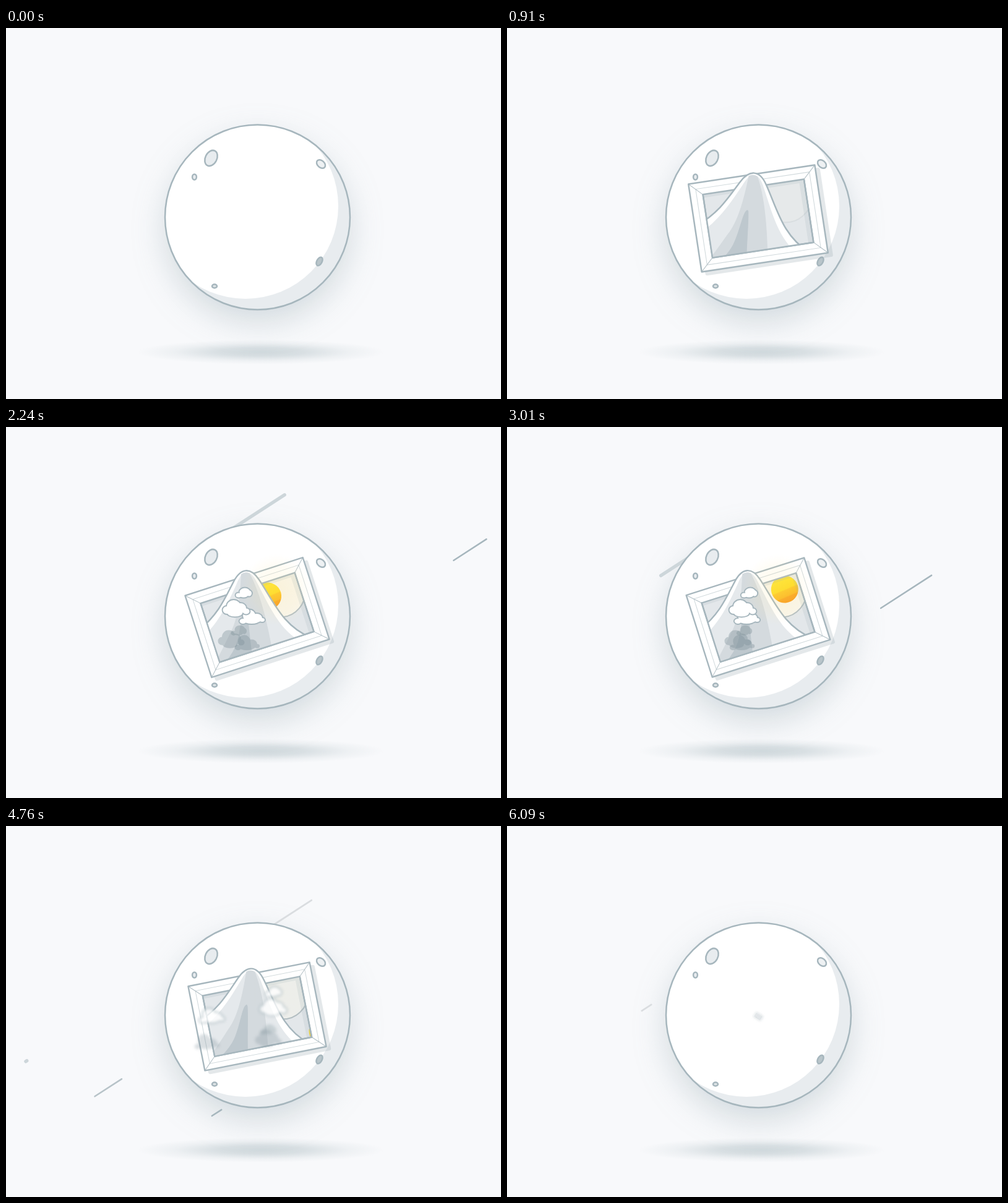
Recreate the animation shown at these times as an HTML page with a canvas. Size 800 px wide and 600 px high, loop 6.16 s.

```html
<!DOCTYPE html>
<html lang="en">
<head>
<meta charset="utf-8">
<title>Mountain picture</title>
<style>
  html, body { margin: 0; width: 100%; height: 100%; overflow: hidden; background: #f8f9fb; }
  canvas { display: block; width: 800px; height: 600px; }
</style>
</head>
<body>
<canvas id="stage" width="800" height="600"></canvas>
<script>
const LOOP = 6160, STEP = 70, TAU = Math.PI * 2, DEG = Math.PI / 180;
const LINE = '#a6b6bd', SHADE = '#e8ecef';
const CX = 406, CY = 308, TILT = 13 * DEG;
const ctx = document.getElementById('stage').getContext('2d');
const layer = document.createElement('canvas');
layer.width = 800;
layer.height = 600;
const lctx = layer.getContext('2d');

// Easing
const part = (t, a, b) => Math.min(1, Math.max(0, (t - a) / (b - a)));
const ramp = (t, a, b) => { const u = part(t, a, b); return u * u * (3 - 2 * u); };
const fade = (t, a, b, c, d) => ramp(t, a, b) * (1 - ramp(t, c, d));
const backOut = u => 1 + 2.70158 * (u - 1) ** 3 + 1.70158 * (u - 1) ** 2;

const pictureScale = t => Math.min(backOut(part(t, 70, 1070)), 1) === 1 && t > 1070 && t < 5104
  ? 1 : backOut(t < 3000 ? part(t, 70, 1070) : part(6104 - t, 0, 1000));

// Slow swing, with a fading turn on entry and a spin on exit
const pictureAngle = t => (-15.2 + 4 * Math.cos(TAU * (t - 4900) / 5000)
  + 14.4 * Math.exp((70 - t) / 857) + 50 * part(t, 5600, 6100) ** 3) * DEG;

const pictureBlur = t => 1.6 * (1 - ramp(t, 300, 1000)) + 1.4 * ramp(t, 5600, 6000);
const mountainDrop = t => 4 + 118 * (1 - part(t, 300, 1100)) ** 2 + 120 * part(t, 5000, 5750) ** 2;

const meteors = [
  { x: 550, base: 401.5, from: 1260, width: 5.5, color: '#cdd6da' },
  { x: 786, base: 684.5, from: 2030, width: 2.5, color: LINE },
  { x: 671, base: 440, from: 3360, width: 2.8, color: '#dadde0' },
  { x: 468, base: 530.3, from: 2860, width: 2.5, color: '#b7c3c8' }
];

// Lobes: x, y, rx, ry
const clouds = [
  { x: 384, y: 268, drift: 48, kick: -28, drop: 61,
    lobes: [[2, -1, 8.5, 6.5], [-8, 4, 4.5, 3.5], [9, 1, 4, 4.5], [0, 4, 7, 3.5]] },
  { x: 397, y: 308, drift: -65, kick: 78, drop: 42,
    lobes: [[-4, -3, 10, 9.5], [-14, 6, 5.5, 4], [8, 1, 9, 7], [17, 4, 4, 3], [0, 6, 12, 4]] },
  { x: 371, y: 294, drift: 60, kick: -43, drop: 50,
    lobes: [[-3, -4, 11, 10], [-14, 2, 6.5, 6], [8, -1, 9, 8], [17, 4, 5.5, 4.5], [-1, 7, 12, 5.5]] }
];
for (const c of clouds) {
  c.path = new Path2D();
  for (const [x, y, rx, ry] of c.lobes) {
    c.path.moveTo(x + rx, y);
    c.path.ellipse(x, y, rx, ry, 0, 0, TAU);
  }
}
const cloudX = (c, t) => c.x + c.drift * Math.max(0, (t - 2240) / 2520) ** 1.6
  + c.kick * (1 - ramp(t, 1150, 2100));

const mountain = new Path2D('M-110 18 L-95 8 C-62 -15 -50 -38 -33 -65 C-26 -76 -19 -81 -12 -81 ' +
  'C-4 -81 2 -76 8 -65 C28 -29 40 14 84 36 L110 46 L110 140 L-110 140 Z');
const body = new Path2D('M-110 34 C-66 8 -46 -30 -29 -60 C-23 -72 -18 -78 -12 -78 ' +
  'C-6 -78 -1 -73 3 -64 C21 -22 34 22 72 44 L110 140 L-110 140 Z');
const band = new Path2D('M-20 -76 C-25 -36 -32 -2 -46 18 C-58 38 -70 58 -85 80 L22 80 C18 20 10 -40 -6 -76 Q-13 -80 -20 -76 Z');
const wedge = new Path2D('M-19 -22 C-25 -18 -27 10 -36 33 Q-44 52 -66 72 L-12 72 C-15 40 -14 0 -16 -20 Q-17 -24 -19 -22 Z');

function circle(x, y, r) {
  ctx.beginPath();
  ctx.arc(x, y, r, 0, TAU);
}

function blur(px) {
  ctx.filter = px > 0.05 ? `blur(${px.toFixed(2)}px)` : 'none';
}

function drawGround() {
  ctx.fillStyle = '#f8f9fb';
  ctx.fillRect(0, 0, 800, 600);
  ctx.save();
  ctx.translate(412, 524);
  ctx.scale(10, 1);
  const g = ctx.createRadialGradient(0, 0, 0, 0, 0, 20);
  g.addColorStop(0, 'rgba(206,215,219,.95)');
  g.addColorStop(0.35, 'rgba(206,215,219,.75)');
  g.addColorStop(0.7, 'rgba(206,215,219,.25)');
  g.addColorStop(1, 'rgba(206,215,219,0)');
  ctx.fillStyle = g;
  ctx.fillRect(-20, -20, 40, 40);
  ctx.restore();

  ctx.save();
  ctx.shadowColor = 'rgba(140,160,168,.35)';
  ctx.shadowBlur = 52;
  ctx.shadowOffsetY = 20;
  ctx.fillStyle = '#fff';
  circle(406.5, 306, 149);
  ctx.fill();
  ctx.restore();
}

// The head runs evenly; the tail starts late and catches up
function drawMeteor(m, t) {
  const age = t - m.from, u = age / 3600;
  if (u <= 0 || u >= 1) return;
  const head = m.x - Math.min(518, 30 + 0.155 * age);
  const tail = m.x - 520 * (0.4 * (1 - Math.cos(Math.PI * u)) + 0.2 * u);
  if (tail < head) return;
  ctx.strokeStyle = m.color;
  ctx.lineWidth = m.width;
  ctx.lineCap = 'round';
  ctx.beginPath();
  ctx.moveTo(head, m.base - head * 0.648);
  ctx.lineTo(tail, m.base - tail * 0.648);
  ctx.stroke();
}

function crater(x, y, rx, ry, angle, fill) {
  ctx.fillStyle = fill;
  ctx.beginPath();
  ctx.ellipse(x, y, rx, ry, angle * DEG, 0, TAU);
  ctx.fill();
  ctx.stroke();
}

function drawBall() {
  ctx.save();
  circle(406.5, 306, 149.5);
  ctx.clip();
  ctx.fillStyle = SHADE;
  ctx.fillRect(250, 150, 310, 310);
  ctx.fillStyle = '#fff';
  circle(387, 288, 150);
  ctx.fill();
  ctx.restore();
  ctx.strokeStyle = LINE;
  ctx.lineWidth = 2.5;
  circle(406.5, 306, 149.5);
  ctx.stroke();
  crater(331.5, 210.5, 9.3, 13.3, 27, SHADE);
  crater(304.5, 241, 3.4, 4.4, 0, SHADE);
  crater(509, 220, 5.6, 8, -48, '#eef1f3');
  crater(506.5, 377.5, 4.2, 7.4, 28, '#b9c5ca');
  crater(337, 417.5, 4, 2.9, 0, '#dde3e6');
}

function drawSun(t) {
  const x = 20 + 0.0342 * (t - 2240);
  if (t < 1400 || x > 110) return;
  const y = -42 + 0.016 * (x - 44) ** 2;
  const g = ctx.createLinearGradient(x - 7, y - 21, x + 7, y + 21);
  g.addColorStop(0, '#ffe72e');
  g.addColorStop(0.5, '#fedb20');
  g.addColorStop(0.54, '#fdc620');
  g.addColorStop(0.76, '#fcb81e');
  g.addColorStop(0.8, '#f9a41b');
  g.addColorStop(1, '#f89a1a');
  ctx.fillStyle = g;
  circle(x, y, 22);
  ctx.fill();
}

function drawSky(t, warm) {
  ctx.save();
  ctx.beginPath();
  ctx.rect(-80, -50, 160, 100);
  ctx.clip();
  ctx.fillStyle = '#e3e7ea';
  ctx.fillRect(-80, -50, 160, 100);
  ctx.save();
  ctx.rotate(TILT);
  ctx.globalAlpha = fade(t, 750, 1250, 4900, 5350);
  const mix = (a, b) => Math.round(a + (b - a) * warm);
  ctx.fillStyle = `rgb(${mix(236, 249)},${mix(237, 246)},${mix(235, 236)})`;
  ctx.strokeStyle = '#b3bec2';
  ctx.lineWidth = 2;
  circle(40, -38, 41);
  ctx.fill();
  ctx.stroke();
  ctx.globalAlpha = 1;
  drawSun(t);
  ctx.restore();
  ctx.fillStyle = 'rgba(150,166,174,.16)';
  ctx.fillRect(72, -50, 8, 100);
  ctx.fillRect(-80, -50, 152, 5);
  ctx.restore();
}

function drawBorder() {
  ctx.fillStyle = '#fff';
  ctx.beginPath();
  ctx.rect(-100, -69.5, 200, 139);
  ctx.rect(-80, -50, 160, 100);
  ctx.fill('evenodd');
  ctx.strokeStyle = '#cfd8db';
  ctx.lineWidth = 1;
  ctx.strokeRect(-90, -60, 180, 120);
  ctx.strokeStyle = '#b3c0c6';
  ctx.beginPath();
  for (const sx of [-1, 1]) for (const sy of [-1, 1]) {
    ctx.moveTo(100 * sx, 69.5 * sy);
    ctx.lineTo(80 * sx, 50 * sy);
  }
  ctx.stroke();
  ctx.strokeStyle = LINE;
  ctx.lineWidth = 2.4;
  ctx.strokeRect(-100, -69.5, 200, 139);
  ctx.strokeRect(-80, -50, 160, 100);
}

function drawMountain(t) {
  ctx.save();
  ctx.beginPath();
  ctx.rect(-80, -130, 160, 180);
  ctx.clip();
  ctx.rotate(TILT);
  ctx.translate(0, mountainDrop(t));
  ctx.save();
  ctx.clip(mountain);
  for (const [path, fill] of [[mountain, '#fff'], [body, '#e5e9ec'], [band, '#d4dade'], [wedge, '#bec8ce']]) {
    ctx.fillStyle = fill;
    ctx.fill(path);
  }
  ctx.restore();
  ctx.strokeStyle = LINE;
  ctx.lineWidth = 2.4;
  ctx.stroke(mountain);
  ctx.restore();
}

function drawGlow(warm) {
  const g = ctx.createRadialGradient(36, -42, 8, 36, -42, 58);
  g.addColorStop(0, `rgba(255,226,140,${0.16 * warm})`);
  g.addColorStop(0.6, `rgba(255,230,160,${0.11 * warm})`);
  g.addColorStop(1, 'rgba(255,235,180,0)');
  ctx.fillStyle = g;
  circle(36, -42, 58);
  ctx.fill();
}

function drawPicture(t) {
  const s = pictureScale(t);
  if (s <= 0) return;
  const angle = pictureAngle(t), soft = pictureBlur(t);
  const warm = fade(t, 1400, 2200, 3900, 4950);
  ctx.save();
  ctx.lineJoin = 'round';
  ctx.translate(CX, CY);

  ctx.save();
  ctx.translate(7 * s, 5 * s);
  ctx.rotate(angle);
  ctx.scale(s, s);
  blur(soft * 1.5);
  ctx.fillStyle = 'rgba(150,167,175,.26)';
  ctx.beginPath();
  ctx.roundRect(-101, -70.5, 202, 141, 3);
  ctx.fill();
  ctx.restore();

  ctx.rotate(angle);
  ctx.scale(s, s);
  drawSky(t, warm);
  blur(soft);
  drawBorder();
  ctx.filter = 'none';
  drawMountain(t);

  // Inner edge in front of the mountain's foot
  ctx.strokeStyle = LINE;
  ctx.lineWidth = 2.4;
  ctx.beginPath();
  ctx.moveTo(-80, -50);
  ctx.lineTo(-80, 50);
  ctx.lineTo(80, 50);
  ctx.lineTo(80, -50);
  ctx.stroke();

  ctx.rotate(TILT);
  drawGlow(warm);
  ctx.restore();
}

function drawClouds(t) {
  const alpha = fade(t, 1150, 1600, 4550, 5200);
  if (alpha <= 0) return;
  const grow = ramp(t, 1000, 2000), size = 0.3 + 0.7 * grow, fall = 0.35 + 0.65 * grow;
  ctx.save();
  blur(4 * ramp(t, 4300, 5200));
  for (const c of clouds) {
    ctx.save();
    ctx.globalAlpha = alpha * 0.38;
    ctx.translate(cloudX(c, t) - 8 * fall, c.y + c.drop * fall);
    ctx.scale(size, size * 1.1);
    ctx.fillStyle = '#7f9199';
    ctx.fill(c.path);
    ctx.restore();
  }
  ctx.globalAlpha = alpha;
  for (const c of clouds) {
    lctx.clearRect(0, 0, 800, 600);
    lctx.save();
    lctx.translate(cloudX(c, t), c.y);
    lctx.scale(size, size);
    lctx.strokeStyle = LINE;
    lctx.lineWidth = 3.8;
    lctx.stroke(c.path);
    lctx.fillStyle = '#fff';
    lctx.fill(c.path);
    lctx.restore();
    ctx.drawImage(layer, 0, 0);
  }
  ctx.restore();
}

function draw(t) {
  drawGround();
  for (const m of meteors) drawMeteor(m, t);
  drawBall();
  drawPicture(t);
  drawClouds(t);
}

const start = performance.now();
function tick() {
  const t = (performance.now() - start) % LOOP;
  draw(Math.floor(t / STEP) * STEP);
  requestAnimationFrame(tick);
}
tick();
</script>
</body>
</html>
```
